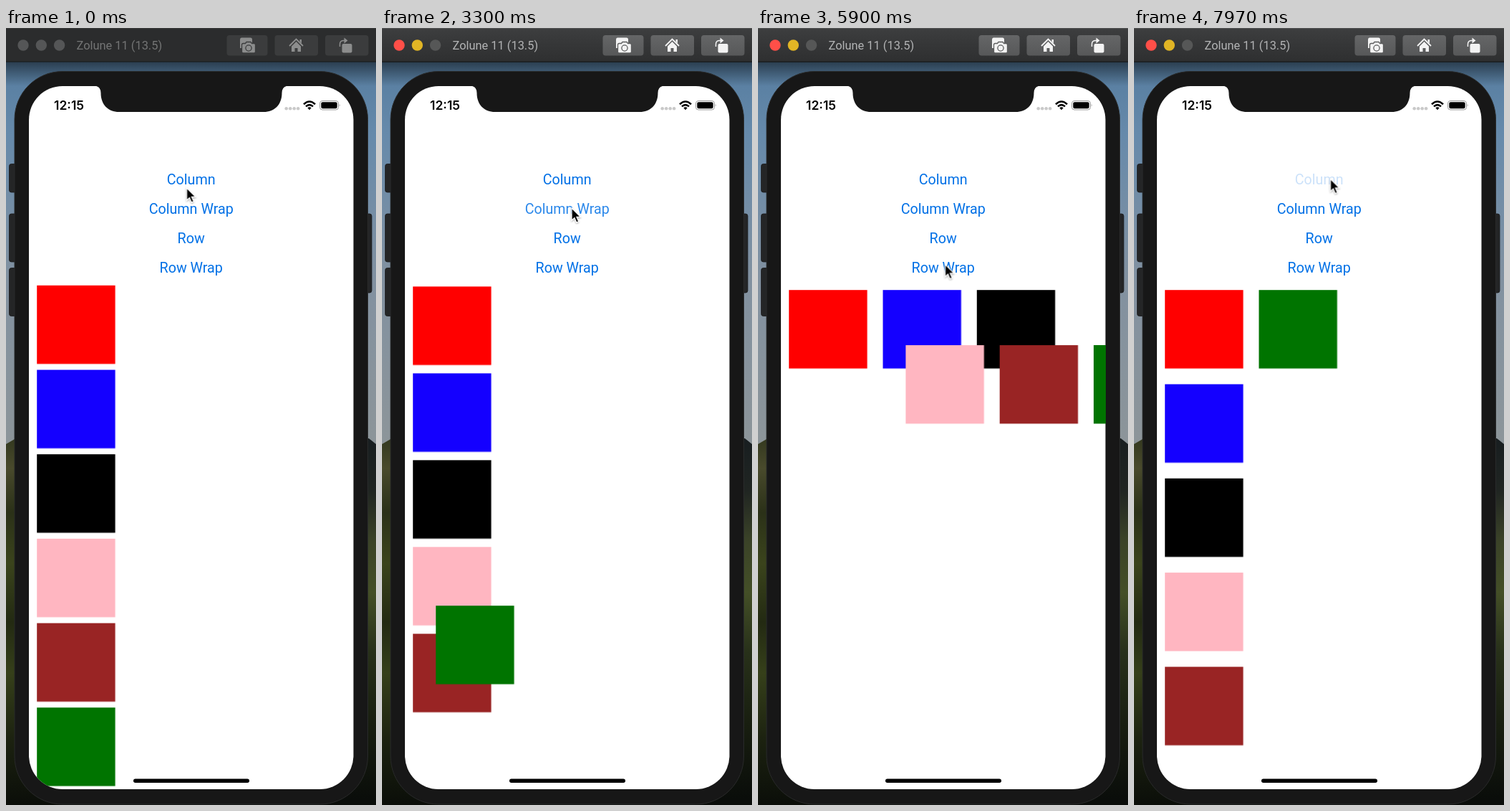
An HTML page that plays this animation: 517 by 1083 pixels, repeating every 8 s.

```html
<!DOCTYPE html>
<html lang="en">
<head>
<meta charset="utf-8">
<title>Flex layouts</title>
<style>
  html, body { margin: 0; width: 100%; height: 100%; overflow: hidden; background: #171717; }
  svg { display: block; width: 100%; height: 100%; }
  .label { font: 19.7px Roboto, "Open Sans", sans-serif; fill: #0070e6; text-anchor: middle; }
  .clock { font: 600 17.5px Inter, Roboto, sans-serif; }
  .title { font: 16.4px Roboto, "Open Sans", sans-serif; }
</style>
</head>
<body>
<svg id="stage" viewBox="0 0 517 1083" preserveAspectRatio="none">
  <defs>
    <linearGradient id="sky" x2="0" y2="1">
      <stop offset="0" stop-color="#4d7599"/>
      <stop offset=".25" stop-color="#668aab"/>
      <stop offset=".6" stop-color="#8291a0"/>
      <stop offset="1" stop-color="#8d9599"/>
    </linearGradient>
    <linearGradient id="leftHill" x2=".02" y2="1">
      <stop offset="0" stop-color="#34391f"/>
      <stop offset=".08" stop-color="#494a2c"/>
      <stop offset=".2" stop-color="#2b3118"/>
      <stop offset=".34" stop-color="#3b441c"/>
      <stop offset=".5" stop-color="#232a12"/>
      <stop offset=".64" stop-color="#36401a"/>
      <stop offset=".82" stop-color="#1c2210"/>
      <stop offset="1" stop-color="#0b0e09"/>
    </linearGradient>
    <linearGradient id="rightHill" x2=".02" y2="1">
      <stop offset="0" stop-color="#171d20"/>
      <stop offset=".16" stop-color="#202522"/>
      <stop offset=".3" stop-color="#3b4328"/>
      <stop offset=".44" stop-color="#444f27"/>
      <stop offset=".6" stop-color="#28311a"/>
      <stop offset=".8" stop-color="#181e10"/>
      <stop offset="1" stop-color="#0a0d0a"/>
    </linearGradient>
    <linearGradient id="barShade" x2="0" y2="1">
      <stop offset="0" stop-color="#000" stop-opacity=".5"/>
      <stop offset="1" stop-color="#000" stop-opacity="0"/>
    </linearGradient>
    <linearGradient id="barOn" x2="0" y2="1">
      <stop offset="0" stop-color="#3d3e3f"/>
      <stop offset="1" stop-color="#2e2f30"/>
    </linearGradient>
    <linearGradient id="keyOn" x2="0" y2="1">
      <stop offset="0" stop-color="#656667"/>
      <stop offset="1" stop-color="#575859"/>
    </linearGradient>
    <filter id="soft" x="-50%" y="-50%" width="200%" height="200%">
      <feDropShadow dx="0" dy="1.2" stdDeviation="1.1" flood-opacity=".35"/>
    </filter>
    <clipPath id="screenClip"><rect x="32" y="81" width="453.5" height="980" rx="47"/></clipPath>
  </defs>

  <rect width="517" height="590" fill="url(#sky)"/>
  <path d="M0 580L12 573H258V1083H0Z" fill="url(#leftHill)"/>
  <path d="M258 572H507L517 580V1083H258Z" fill="url(#rightHill)"/>
  <rect y="47" width="517" height="34" fill="url(#barShade)"/>

  <g fill="#242526" stroke="#18191a" stroke-width=".8">
    <rect x="4.5" y="189.500" width="12" height="39.500" rx="3"/>
    <rect x="4.5" y="259" width="12" height="67" rx="3"/>
    <rect x="4.5" y="334.500" width="12" height="67" rx="3"/>
    <rect x="500" y="259" width="11" height="110" rx="3"/>
  </g>
  <rect x="12" y="60.500" width="493.500" height="1021.500" rx="67" fill="#171717" stroke="#292a2a"/>

  <g clip-path="url(#screenClip)">
    <rect x="32" y="81" width="454" height="980" fill="#fff"/>
    <g id="labels"></g>
    <g id="boxes"></g>
    <path d="M123 80.500Q132.500 81 132.500 90.500C132.500 107 143 117 158 117H360C375 117 385.500 107 385.500 90.500Q385.500 81 395 80.500Z" fill="#171717"/>
    <text class="clock" x="67" y="114">12:15</text>
    <g fill="#c9c9c9">
      <circle cx="391.700" cy="112.300" r="2.300"/><circle cx="397.200" cy="112.300" r="2.300"/>
      <circle cx="402.700" cy="112.300" r="2.300"/><circle cx="408.100" cy="112.300" r="2.300"/>
    </g>
    <g fill="none" stroke="#000" stroke-width="2.600">
      <path d="M416 106.300Q424 98.700 432 106.300"/>
      <path d="M419 109.400Q424 104.800 429 109.400"/>
      <path d="M421.300 111.300Q424 109 426.700 111.300L424 114.200Z" fill="#000" stroke="none"/>
    </g>
    <rect x="438.500" y="101.500" width="26" height="12.500" rx="3.600" fill="none" stroke="#999"/>
    <rect x="440.300" y="103.300" width="22.400" height="8.900" rx="2.200"/>
    <path d="M465.800 105.800Q467.600 107.700 465.800 109.800Z" fill="#999"/>
    <rect x="178" y="1046.500" width="162" height="5.500" rx="2.750"/>
  </g>

  <g id="bars"></g>
  <g id="cursor" filter="url(#soft)">
    <path d="M0 0V17.200L3.900 13.500L6.700 20L9.700 18.700L6.900 12.400H12.300Z" stroke="#fff" stroke-width="1.200"/>
  </g>
</svg>

<script>
const LOOP = 8000, SIZE = 109.4, LEFT = 43.2;
const $ = id => document.getElementById(id);

function add(parent, tag, attrs, text = '') {
  const el = document.createElementNS('http://www.w3.org/2000/svg', tag);
  for (const name in attrs) el.setAttribute(name, attrs[name]);
  el.textContent = text;
  return parent.appendChild(el);
}

// steps: [ms, value, easing towards the next step]
function play(el, prop, steps) {
  const frames = steps.map(([ms, value, easing = 'linear']) =>
    ({ offset: ms / LOOP, [prop]: value, easing }));
  frames.push({ offset: 1, [prop]: steps[steps.length - 1][1] });
  el.animate(frames, { duration: LOOP, iterations: Infinity });
}

const move = (x, y) => `translate(${x}px, ${y}px)`;

// Simulator window bar
function drawBar(look) {
  const g = add($('bars'), 'g', {});
  add(g, 'rect', { width: 517, height: 47, fill: look.bar });
  add(g, 'rect', { y: 0, width: 517, height: 1, fill: look.edge });
  add(g, 'rect', { y: 46.5, width: 517, height: 1, fill: '#171819' });
  look.lights.forEach((fill, i) => add(g, 'circle', { cx: 24 + i * 25.3, cy: 24, r: 7.7, fill }));
  add(g, 'text', { class: 'title', x: 98.5, y: 30, fill: look.text }, 'Zolune 11 (13.5)');
  [[308.5, 57], [375.5, 60.5], [446, 60.5]].forEach(([x, width]) =>
    add(g, 'rect', { x, y: 10, width, height: 28.5, rx: 4, fill: look.key }));

  const icon = (d, extra = {}) => add(g, 'path', { d, fill: look.icon, ...extra });
  const line = { fill: 'none', stroke: look.icon, 'stroke-width': 1.8 };
  const cut = { stroke: look.gap, 'stroke-width': 1.3 };
  icon('M329 13.500H341.500Q344 13.500 344 16V28H327V16Q327 13.500 329 13.500Z');
  icon('M331.500 21.500H334.500L336 19.500H342L343.500 21.500H346.500Q348.500 21.500 348.500 23.500V33Q348.500 35 346.500 35H331.500Q329.500 35 329.500 33V23.500Q329.500 21.500 331.500 21.500Z', cut);
  add(g, 'circle', { cx: 339, cy: 28, r: 4.1, fill: look.icon, ...cut });
  icon('M396 25L405.500 15.500L415 25', line);
  icon('M399 25.500L405.500 19L412 25.500V33H407.500V28H403.500V33H399Z');
  icon('M410.500 16H413V21.500L410.500 19Z');
  add(g, 'rect', { x: 469.5, y: 22, width: 14, height: 12.5, rx: 2, fill: look.icon });
  icon('M466.500 26V22.500Q466.500 17.500 472 17.500H474', { ...line, 'stroke-width': 1.5 });
  icon('M472.500 13.500L477.500 17.500L472.500 21.500Z');
  return g;
}

drawBar({
  bar: '#2b2c2d', edge: '#3a3b3b', text: '#747575', key: '#3b3c3d', icon: '#8c8d8d', gap: '#3b3c3d',
  lights: ['#555657', '#555657', '#555657']
});
const activeBar = drawBar({
  bar: 'url(#barOn)', edge: '#555656', text: '#b3b4b5', key: 'url(#keyOn)', icon: '#f3f3f3', gap: '#5c5d5e',
  lights: ['#ff4f48', '#e1b525', '#565757']
});
play(activeBar, 'opacity', [[0, 0, 'step-end'], [2970, 1]]);

// Buttons: each press is [down, up]
const buttons = [
  ['Column', [[7800, 8100]]],
  ['Column Wrap', [[2970, 3130], [6810, 6965]]],
  ['Row', [[4300, 4456]]],
  ['Row Wrap', [[5470, 5626]]]
];
buttons.forEach(([name, presses], i) => {
  const label = add($('labels'), 'text', { class: 'label', x: 258.7, y: 218.3 + i * 41 }, name);
  const steps = [[0, 1]];
  for (const [down, up] of presses) {
    steps.push([down, 1, 'ease-in-out'], [down + 150, 0.2]);
    if (up < LOOP) steps.push([up, 0.2, 'ease-in-out'], [up + 250, 1]);
  }
  play(label, 'opacity', steps);
});

// Layouts give the place of box i
const cell = (col, row) => move(LEFT + col * 131.3, 365.2 + row * 131.3);
const layouts = {
  column: i => move(LEFT, 358.8 + i * 117.68),
  columnWrap: i => cell(Math.floor(i / 5), i % 5),
  row: i => cell(i, 0),
  rowWrap: i => cell(i % 3, Math.floor(i / 3))
};
const changes = [[3130, 'columnWrap'], [4456, 'row'], [5626, 'rowWrap'], [6965, 'columnWrap']];

['#f00', '#1400ff', '#000', '#ffb6c1', '#992424', '#007400'].forEach((fill, i) => {
  const box = add($('boxes'), 'rect', { width: SIZE, height: SIZE, fill });
  let place = layouts.column(i);
  const steps = [[0, place]];
  for (const [start, name] of changes) {
    steps.push([start, place, 'ease-in-out']);
    place = layouts[name](i);
    steps.push([start + 500, place]);
  }
  play(box, 'transform', steps);
});

// Pointer path
const path = [
  [0, 252.5, 223], [700, 254, 222], [1500, 267.5, 209], [2350, 267.5, 209],
  [2850, 266, 250], [3350, 265, 251], [3900, 260.5, 290.5], [4130, 260.5, 290.5],
  [4500, 260.5, 295.5], [4950, 260.5, 295.5], [5400, 261.5, 329.5], [6150, 261.5, 329.5],
  [6700, 270.5, 253.5], [7250, 270.5, 253.5], [7720, 274.5, 210.5]
];
play($('cursor'), 'transform', path.map(([ms, x, y]) => [ms, move(x, y), 'ease-in-out']));
</script>
</body>
</html>
```
